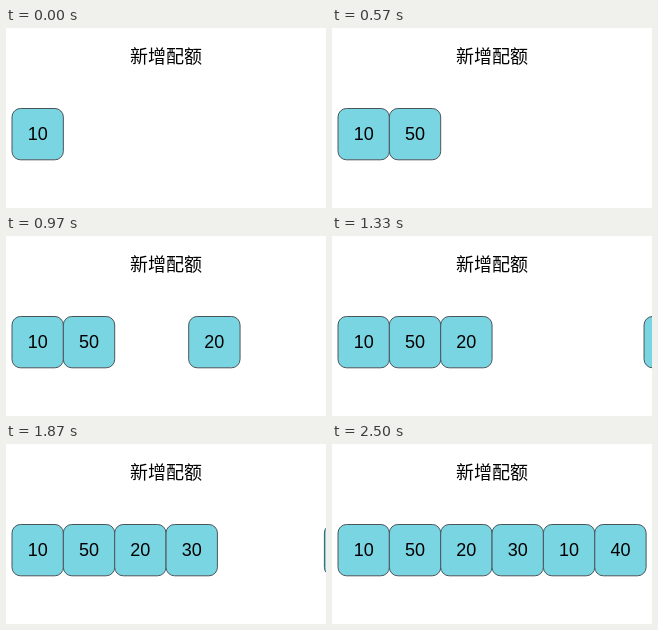
These frames come from a looping animation (320x180 px, 3.46 s). An HTML page:

```html
<!DOCTYPE html>
<html lang="zh-CN">
<head>
<meta charset="utf-8">
<style>
html, body { margin: 0; width: 100%; height: 100%; overflow: hidden; background: #fff; }
svg { display: block; width: 320px; height: 180px; }
text { font: 18px "Liberation Sans", Arial, sans-serif; text-anchor: middle; }
.title { font-family: "Noto Sans CJK SC", "Noto Sans CJK", sans-serif; }
rect { fill: #7ad5e3; stroke: #4a555a; stroke-width: 1; }
</style>
</head>
<body>
<svg viewBox="0 0 320 180">
  <text class="title" x="160" y="34.5">新增配额</text>
  <g id="row"></g>
</svg>
<script>
const LOOP = 3460, LEFT = 6, SIZE = 51.35;

// Each box: its number, when it lands, and [ms before landing, px still to go] steps.
const boxes = [
  { n: 10, end: 0, steps: [] },
  { n: 50, end: 570, steps: [[170, 123], [140, 78], [100, 40]] },
  { n: 20, end: 1100, steps: [[230, 187], [200, 152], [130, 74], [100, 40]] },
  { n: 30, end: 1530, steps: [[200, 152], [160, 107], [100, 40]] },
  { n: 10, end: 2030, steps: [[160, 107], [130, 74], [100, 40]] },
  { n: 40, end: 2500, steps: [[100, 40]] }
];

const row = document.getElementById('row');
row.innerHTML = boxes.map(b => `<g>
  <rect y="80.5" width="${SIZE}" height="51.3" rx="8.5"/>
  <text x="${SIZE / 2}" y="112">${b.n}</text></g>`).join('');

function draw(now) {
  const t = now % LOOP;
  boxes.forEach((b, i) => {
    const g = row.children[i];
    const step = [...b.steps, [0, 0]].filter(s => t >= b.end - s[0]).pop();
    g.style.display = step ? '' : 'none';
    if (step) g.setAttribute('transform', `translate(${LEFT + i * SIZE + step[1]} 0)`);
  });
}

const start = performance.now();
function tick() {
  draw(performance.now() - start);
  requestAnimationFrame(tick);
}
tick();
</script>
</body>
</html>
```
